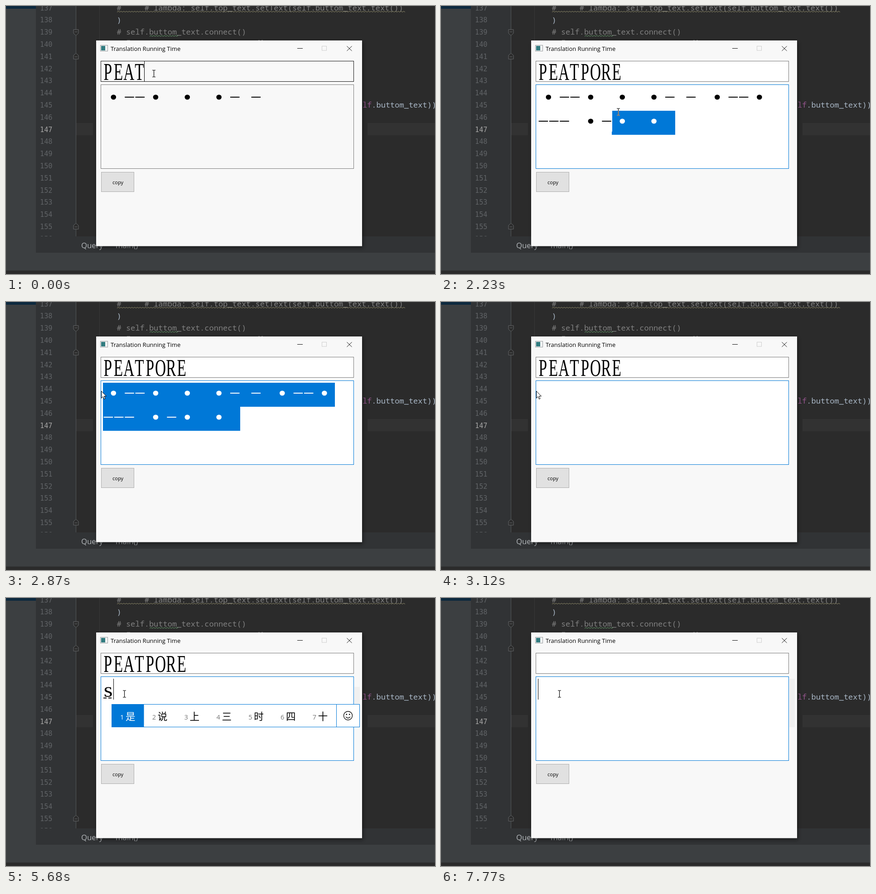
Write an HTML page that moves like this. It is 947 px wide and 591 px high and loops after 8 s.

```html
<!DOCTYPE html>
<html lang="en">
<head>
<meta charset="utf-8">
<title>Morse translator</title>
<style>
  html, body { margin: 0; width: 100%; height: 100%; overflow: hidden; background: #2b2b2b; }
  svg { display: block; width: 947px; height: 591px; }
  text { white-space: pre; }
  .code { font: 17px "Noto Sans Mono", "DejaVu Sans Mono", monospace; fill: #a9b7c6; }
  .comment { fill: #808080; }
  .self { fill: #94558d; }
  .number { font: 15.2px "DejaVu Sans Mono", monospace; fill: #606366; }
  .number.current { fill: #a4a3a3; }
  .ui { font-family: "Open Sans", "Noto Sans", sans-serif; }
  .serif { font-family: "Liberation Serif", "Noto Serif", serif; text-anchor: middle; }
  .cjk { font: 21.5px "Noto Sans CJK SC", "Noto Sans CJK", sans-serif; }
  .wave, .line { fill: none; }
  .pointer { mix-blend-mode: difference; }
</style>
</head>
<body>
<svg id="stage" viewBox="0 0 947 591">
  <defs>
    <clipPath id="editorClip"><rect width="947" height="508"/></clipPath>
    <clipPath id="selectionClip"><path id="selectionShape"/></clipPath>
    <filter id="shadow" x="-10%" y="-10%" width="120%" height="120%">
      <feDropShadow dx="2" dy="4" stdDeviation="5" flood-opacity=".45"/>
    </filter>
    <path id="fold" d="M-5.5-6.5h11v8l-5.5 5-5.5-5zM-3-1.5h6" fill="#2b2b2b" stroke="#66696b"/>
  </defs>

  <rect width="947" height="591" fill="#2b2b2b"/>
  <g id="editor" clip-path="url(#editorClip)">
    <rect x="66" width="88" height="508" fill="#313335"/>
    <path d="M155 258h37v27h-37zM798 258h149v27h-149z" fill="#323232"/>
    <path d="M154.5 0V508" stroke="#55585a"/>
    <path d="M206.5 0V76" stroke="#393939"/>
    <use href="#fold" x="154.5" y="58.5"/>
    <use href="#fold" transform="translate(154.5 110.5) scale(1 -1)"/>
    <use href="#fold" transform="translate(154.5 485.5) scale(1 -1)"/>
    <text class="code comment" x="244.5" y="9.5">#     # lambda: self.top_text.setText(self.buttom_text.text())</text>
    <text class="code" x="244.5" y="36.5">)</text>
    <text class="code comment" x="244.5" y="63"># self.buttom_text.connect()</text>
    <path d="M267 75.5h7M557 75.5h3M564 75.5h3" stroke="#707070"/>
    <text class="code" x="766.5" y="223.5"><tspan class="self">self</tspan>.buttom_text))</text>
  </g>
  <rect x="66" y="508" width="881" height="35" fill="#313335"/>
  <rect width="66" height="583" fill="#3c3f41"/>
  <rect width="66" height="6" fill="#0d293e"/>
  <rect y="543" width="947" height="40" fill="#3c3f41"/>
  <path d="M66 543.5H947M0 583.5H947" stroke="#303234"/>
  <g class="ui" font-size="16.8" fill="#b4b8bb">
    <text x="166" y="534">Query</text>
    <text x="242" y="534">main()</text>
  </g>

  <rect x="199" y="76" width="587" height="453.5" fill="#f8f8f8" filter="url(#shadow)"/>
  <rect x="208.5" y="86.5" width="16" height="13" fill="#f4f4f4" stroke="#9a9da0"/>
  <rect x="210" y="88" width="9" height="10" fill="#327c80"/>
  <text class="ui" x="231" y="98.5" font-size="13">Translation Running Time</text>
  <path class="line" d="M643 93.5h12M752.5 88.5l11 10.5M763.5 88.5l-11 10.5" stroke="#111"/>
  <rect class="line" x="697.5" y="88.5" width="10" height="9.5" stroke="#cfcfcf"/>
  <rect x="210.5" y="366.5" width="72" height="43" fill="#e1e1e1" stroke="#adadad"/>
  <text class="ui" x="235" y="392.5" font-size="11">copy</text>

  <g id="app"></g>
</svg>
<script>
const LOOP = 8000;
const WORD = "PEATPORE";
const MORSE = { P: ".--.", E: ".", A: ".-", T: "-", O: "---", R: ".-." };
const CELL = 23.28, LEFT = 214, FULL = 726, TAIL = 517;
const TYPED_AT = [0, 0, 0, 0, 430, 580, 730, 730];
const BLUE = "#0078d7";
const app = document.getElementById("app");
const editor = document.getElementById("editor");
const timed = [];

function add(tag, attrs, parent = app, content = "") {
  const node = document.createElementNS("http://www.w3.org/2000/svg", tag);
  for (const key in attrs) node.setAttribute(key, attrs[key]);
  node.textContent = content;
  return parent.appendChild(node);
}

function during(node, ...spans) {
  timed.push({ node, spans });
  return node;
}

function zigzag(x, y, width, color) {
  let d = `M${x} ${y}`;
  for (let i = 0; i * 3 < width; i++) d += `l3 ${i % 2 ? 2 : -2}`;
  add("path", { class: "wave", d, stroke: color }, editor);
}

// Text on a fixed grid, one letter per cell.
function gridText(text, x, y, size, condense) {
  const xs = [...text].map((_, i) => (i + 0.5) * CELL / condense).join(" ");
  const transform = `translate(${x} ${y}) scale(${condense} 1)`;
  return add("text", { class: "serif", "font-size": size, x: xs, transform }, app, text);
}

function drawMorse(parent, color) {
  let column = 0, row = 0;
  [...WORD].forEach((letter, i) => {
    if (i === 5) { column = 0; row = 1; }
    const group = during(add("g", { fill: color }, parent), [TYPED_AT[i], 3120]);
    const y = 201 + row * 53;
    for (const mark of MORSE[letter]) {
      const units = mark === "." ? 2 : 1;
      const x = LEFT + (column + units / 2) * CELL;
      if (units === 2) add("ellipse", { cx: x, cy: y, rx: 5.8, ry: 5.5 }, group);
      else add("rect", { x: x - 10, y: y - 1, width: 20.5, height: 2 }, group);
      column += units;
    }
    column++;
  });
}

function frame(y, height, fill, stroke, ...spans) {
  during(add("rect", { x: 209.5, y, width: 558, height, fill, stroke }), ...spans);
}

function caret(x, top, bottom, color, ...spans) {
  during(add("path", { d: `M${x} ${top}V${bottom}`, stroke: color }), ...spans);
}

function current(steps, time) {
  return steps.filter(step => step[0] <= time).pop();
}

// Editor gutter and spelling marks
for (let n = 137; n <= 156; n++) {
  add("text", { class: n === 147 ? "number current" : "number", x: 75, y: 9.5 + (n - 137) * 26.8 }, editor, n);
}
zigzag(245, 13.5, 634, "#8c8868");
zigzag(317, 67, 61, "#659c6b");

// Text boxes
frame(121.5, 45, "#f9f9f9", "#151515", [0, 1680]);
frame(121.5, 45, "#fff", "#1f4e79", [1680, 2080]);
frame(121.5, 45, "#fff", "#7a7a7a", [2080, LOOP]);
frame(173.5, 185, "#f8f8f8", "#7a7a7a", [0, 2080]);
during(add("rect", { x: 210, y: 174, width: 557, height: 123, fill: "#fff" }), [1680, 2080]);
frame(173.5, 185, "#fff", BLUE, [2080, LOOP]);
during(add("rect", { x: 769, y: 196, width: 12, height: 89, fill: "#f0f0f0" }), [5410, LOOP]);
during(add("rect", { x: 769, y: 178, width: 12, height: 18, fill: "#f0f0f0" }), [6110, LOOP]);

// Typed word
[[4, 0, 430], [5, 430, 580], [6, 580, 730], [8, 730, 6660]].forEach(([count, from, to]) => {
  during(gridText(WORD.slice(0, count), 213, 163, 52, 0.64), [from, to]);
  caret(Math.round(213 + count * CELL) - 0.5, 122, 167, "#000", [from, Math.min(to, 1410)]);
});

// Morse output and its selection
drawMorse(app, "#000");
const selection = during(add("g", { "clip-path": "url(#selectionClip)" }), [2080, 3120]);
add("rect", { x: LEFT, y: 178, width: 512, height: 106, fill: BLUE }, selection);
drawMorse(selection, "#fff");
caret(377.5, 231, 277, "#fff", [2230, 2350]);
const selectionShape = document.getElementById("selectionShape");
const selectionSteps = [[0, TAIL, 1], [2080, 470, 1], [2230, 377, 1], [2350, 307, 0], [2470, 260.6, 0], [2620, LEFT, 0]];

// Composed letter
during(gridText("s", LEFT, 218, 46, 1.1), [5410, 7210]);
during(add("path", { d: "M215 220.5H238", stroke: "#000", "stroke-width": 2, "stroke-dasharray": "7 4" }), [5410, 6230]);
caret(214.5, 178, 224, "#000", [3700, 4260], [4660, 5250], [7770, LOOP]);
caret(237.5, 178, 224, "#000", [5680, 6110], [6810, 7210]);

// Candidate bar
const popup = during(add("g", {}), [5410, 6110]);
add("rect", { x: 233.5, y: 234.5, width: 547, height: 50, fill: "#fff", stroke: BLUE }, popup);
add("rect", { x: 233, y: 234, width: 71.5, height: 51, fill: BLUE }, popup);
add("path", { d: "M729.5 234V285", stroke: BLUE }, popup);
[..."是说上三时四十"].forEach((glyph, i) => {
  const x = 252 + i * 70.8;
  add("text", { class: "ui", x, y: 268, "font-size": 14.5, fill: i ? "#777" : "#fff" }, popup, i + 1);
  add("text", { class: "cjk", x: x + 12, y: 269, fill: i ? "#000" : "#fff" }, popup, glyph);
});
add("circle", { class: "line", cx: 755, cy: 259.5, r: 9.5, stroke: "#111", "stroke-width": 1.4 }, popup);
add("path", { class: "line", d: "M750 262q5 5.5 10 0", stroke: "#111", "stroke-width": 1.4 }, popup);
add("path", { d: "M750.5 255.5h2.5v2.5h-2.5zM757 255.5h2.5v2.5h-2.5z", fill: "#111" }, popup);

// Mouse pointers
const beam = during(add("path", {
  class: "pointer line", stroke: "#fff", "stroke-width": 1.2,
  d: "M-3.5-7.5h2.5l1 .8 1-.8h2.5M-3.5 7.5h2.5l1-.8 1 .8h2.5M0-7V7"
}), [0, 430], [1410, 2745], [3980, LOOP]);
const arrow = during(add("path", {
  d: "M0 0V15.5l3.6-3.4 2.5 5.6 2.4-1.1-2.4-5.4h4.8z", fill: "#fff", stroke: "#000"
}), [2745, 3980]);
const pointerSteps = [
  [0, 326.5, 149], [1410, 327, 148], [1530, 345, 152], [1680, 521.5, 289.5], [1805, 523, 280],
  [1930, 521, 268], [2080, 485, 258], [2230, 391.5, 233.5], [2350, 310, 215], [2470, 254, 206],
  [2620, 228, 204], [2745, 213, 198], [2870, 210.5, 196.5], [3980, 239.5, 204.5],
  [4130, 252, 208], [4260, 261.5, 211.5]
];

function render(now) {
  const time = now % LOOP;
  for (const { node, spans } of timed) {
    const on = spans.some(([from, to]) => time >= from && time < to);
    node.style.display = on ? "" : "none";
  }
  const [, start, row] = current(selectionSteps, time);
  selectionShape.setAttribute("d", row
    ? `M${start} 231H${TAIL}V284H${start}z`
    : `M${start} 178H${FULL}V231H${TAIL}V284H${LEFT}V231H${start}z`);
  const [, x, y] = current(pointerSteps, time);
  for (const pointer of [beam, arrow]) pointer.setAttribute("transform", `translate(${x} ${y})`);
}

function tick() {
  render(performance.now());
  requestAnimationFrame(tick);
}
tick();
</script>
</body>
</html>
```
